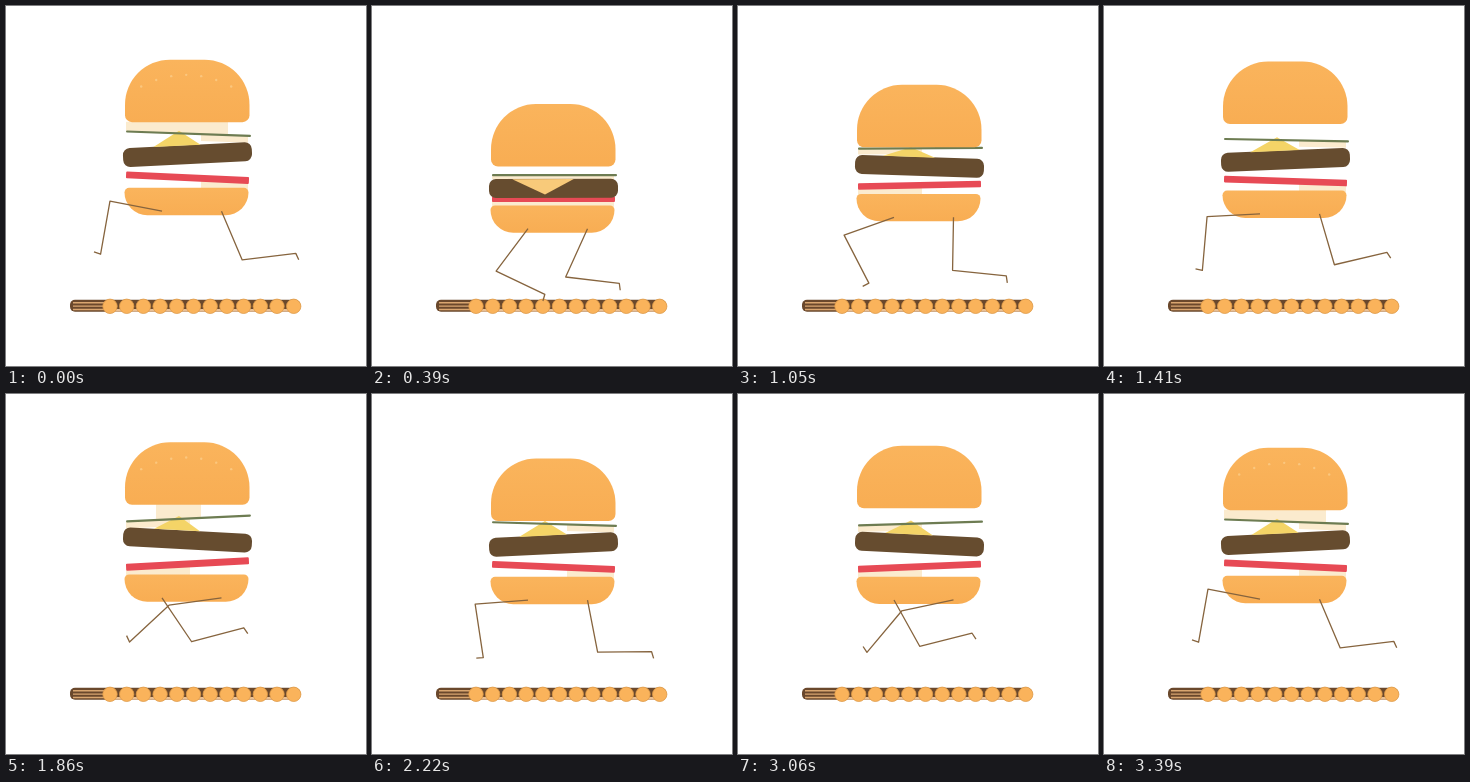
An HTML page with a canvas for the animation above (3420 ms loop, 360 px wide and 360 px high).

```html
<!DOCTYPE html>
<html lang="en">
<head>
<meta charset="utf-8">
<title>Running burger</title>
<style>
html, body { margin: 0; width: 100%; height: 100%; overflow: hidden; background: #fff; }
canvas { display: block; width: 360px; height: 360px; }
</style>
</head>
<body>
<canvas id="stage" width="360" height="360"></canvas>
<script>
const ctx = document.getElementById('stage').getContext('2d');
const LOOP = 3420, TICK = 30, STEP = 15;
const CREAM = '#fbebce', PATTY = '#664c2f', RED = '#e74a55', LEAF = '#6d7c52';
const WOOD = '#6a482c', GRAIN = '#d9a670', LOG = '#fab35b';

// how far the stack has dropped during one step: 0 in the air, 1 squashed
const DROP = [[0, .12], [2, .02], [5, 0], [7, .11], [8, .21], [10, .91], [11.5, 1], [13, .65], [15, .12]];
// key poses of one leg over two steps: phase, thigh angle, shin angle
const LEG = [
  [1, 191, 100], [5, 172, 137], [7, 168, 130], [8, 177, 95], [10, 139, 32],
  [16, 67, -7], [20, 56, -15], [22, 61, -14], [25, 99, -12], [31, 191, 100]
];

function sample(keys, p) {
  let i = 1;
  while (i < keys.length - 1 && keys[i][0] < p) i++;
  const a = keys[i - 1], b = keys[i], f = (p - a[0]) / (b[0] - a[0]);
  return a.map((v, k) => v + (b[k] - v) * f);
}

const drop = phase => sample(DROP, (phase + STEP) % STEP)[1];

function poly(color, ...pts) {
  ctx.fillStyle = color;
  ctx.beginPath();
  pts.forEach(([x, y]) => ctx.lineTo(x, y));
  ctx.fill();
}

function box(color, x, y, w, h, r) {
  ctx.fillStyle = color;
  ctx.beginPath();
  ctx.roundRect(x, y, w, h, r);
  ctx.fill();
}

function slab(color, x, y, w, h, r, tilt) {
  ctx.save();
  ctx.translate(x + w / 2, y);
  ctx.rotate(Math.atan2(tilt, w));
  box(color, -w / 2, -h / 2, w, h, r);
  ctx.restore();
}

function bun(x, y, w, h, r) {
  const shade = ctx.createLinearGradient(0, y, 0, y + h);
  shade.addColorStop(0, '#fab45c');
  shade.addColorStop(1, '#f8ad53');
  box(shade, x, y, w, h, r);
}

function leg(x, y, phase) {
  const [, thigh, shin] = sample(LEG, 1 + (phase + 29) % 30);
  ctx.beginPath();
  ctx.moveTo(x, y);
  [[thigh, 53], [shin, 54], [shin + 74 + shin / 4, 7]].forEach(([deg, len]) => {
    const a = deg * Math.PI / 180;
    x += Math.cos(a) * len;
    y += Math.sin(a) * len;
    ctx.lineTo(x, y);
  });
  ctx.strokeStyle = '#86643e';
  ctx.lineWidth = 1.3;
  ctx.lineJoin = 'round';
  ctx.stroke();
}

function platform() {
  box(WOOD, 64, 293.7, 230, 12, 5);
  for (let k = 0; k < 3; k++) box(GRAIN, 67, 296 + k * 3.4, 34, 1.4, 0);
  box('#e9bf94', 104, 303, 184, 2.8, 0);
  for (let k = 0; k < 12; k++) {
    ctx.beginPath();
    ctx.arc(104 + k * 16.7, 300.3, 7.2, 0, 7);
    ctx.fillStyle = LOG;
    ctx.fill();
    ctx.strokeStyle = '#dd9a48';
    ctx.lineWidth = 0.8;
    ctx.stroke();
  }
}

function burger(phase) {
  const u = drop(phase), air = 1 - u, high = u < 0.1;
  const left = phase % 30 < STEP, side = left ? 1 : -1;
  const top = 48 + 54 * drop(phase - 0.7), low = 180.5 + 19.5 * u;
  const leaf = { y: 124.5 + 46 * u, tilt: 6 * side * air ** 4 };
  const patty = { y: 146 + 37.5 * u, tilt: -7 * side * air };
  const tomato = { y: 170 + 24 * u, tilt: 6.5 * side * air ** 2 };

  const at = (layer, x) => layer.y + layer.tilt * (x - 182) / 125;
  const fill = (x0, x1, a, b) => poly(CREAM,
    [x0, at(a, x0)], [x1, at(a, x1)], [x1, at(b, x1)], [x0, at(b, x0)]);
  const level = y => ({ y, tilt: 0 });
  const under = { y: leaf.y + 7 - 3 * u, tilt: leaf.tilt };

  // sauce shows on the side the layers lean to
  if (high && left) fill(120, 222, level(top + 62), leaf);
  if (high && !left) fill(150, 195, level(top + 62), leaf);
  const squashed = u > 0.8;
  const [x0, x1] = squashed ? [120, 242] : left ? [195, 242] : [120, 184];
  fill(x0, x1, leaf, under);
  fill(x0, x1, tomato, level(low + 2));

  bun(118.5, low, 124, 27.3, [5, 5, 25, 25]);
  slab(RED, 120, tomato.y, 123, 7 - 1.5 * u, 1, tomato.tilt);
  slab(PATTY, 117, patty.y, 129, 19, 7, patty.tilt);

  // cheese corner flips from pointing up to hanging down
  const half = 23 + 8 * u;
  poly(u > 0.5 ? '#f8ca7a' : '#f4d467',
    [171 - half, at(patty, 171 - half) - 9.3],
    [173, patty.y - 24 + 32 * u * u],
    [171 + half, at(patty, 171 + half) - 9.3]);
  slab(LEAF, 120, leaf.y, 125, 2.2, 1, leaf.tilt);

  bun(119, top, 124.5, 62.5, [45, 45, 7, 7]);
  for (let k = 0; high && k < 7; k++) {
    box('#fbc77e', 134 + k * 15, top + 14 + 1.3 * (k - 3) ** 2, 2.4, 2.4, 1.2);
  }
  return low + 23.3;
}

function draw(time) {
  const tick = Math.floor(time % LOOP / TICK);
  // every fifth tick holds the pose
  const phase = tick - Math.floor((tick - 1) / 5);
  ctx.fillStyle = '#fff';
  ctx.fillRect(0, 0, 360, 360);
  platform();
  const hip = burger(phase);
  leg(156, hip, phase);
  leg(215.5, hip, phase + STEP);
}

const start = performance.now();
function loop() {
  draw(performance.now() - start);
  requestAnimationFrame(loop);
}
loop();
</script>
</body>
</html>
```
